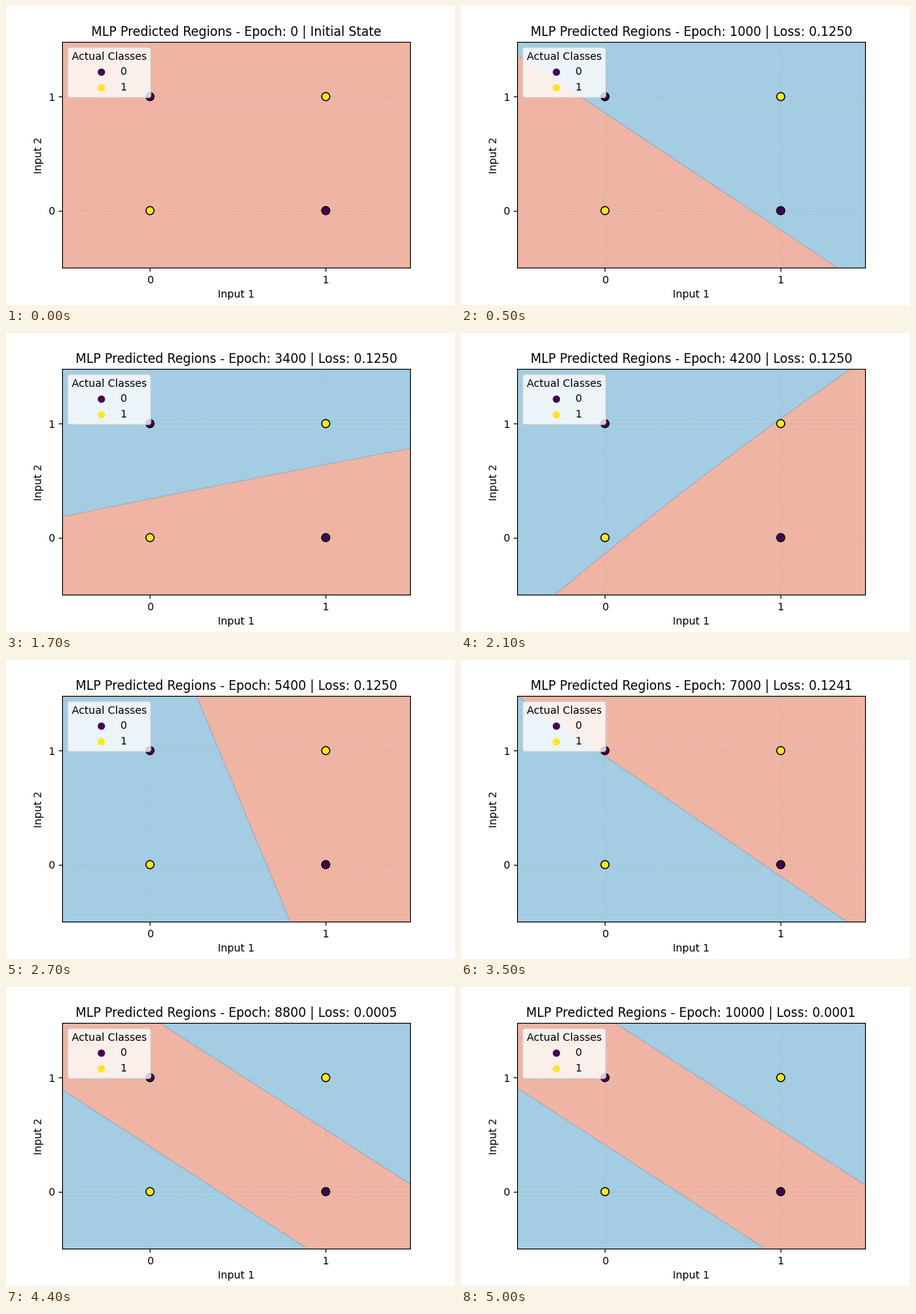
Write a matplotlib script that moves like this. It is 600x400 px and loops after 5.1 s.

```python
import numpy as np
import matplotlib.pyplot as plt
from matplotlib.animation import FuncAnimation

FRAMES, INTERVAL, EPOCHS_PER_FRAME = 51, 100, 200


def ramp(i, middle, width):
    return 1 / (1 + np.exp((middle - i) / width))


def bump(i, middle, width):
    return np.exp(-((i - middle) / width) ** 2)


def decay(i, start, span):
    return np.exp((start - i) / span)


def main_angle(i):
    """Direction in degrees: a slow drift, then a quick turn that settles."""
    still_to_turn = (184 - 2.55 * i) * (1 - ramp(i, 24.96, 2.4))
    return 147 - still_to_turn - 50 * decay(i, 0, 3)


def main_offset(i):
    """Pixels from the plot centre: enters, wobbles, then moves aside."""
    entry = 320 * decay(i, 0, 1.2) - 26 * bump(i, 6, 3)
    wobble = 17 * bump(i, 30.5, 2) - 15.5 * bump(i, 24, 5)
    aside = 72 * ramp(i, 36.9, 0.75) + 11 * bump(i, 40, 3)
    return 1 + entry + wobble + aside


def corner_angle(i):
    return -32.55 - 0.04 * (i - 39)


def corner_offset(i):
    return 71.3 + 14.7 * decay(i, 39, 1.2)


def loss(i):
    """A long plateau followed by a power-law fall."""
    fall = np.log1p(np.exp((i - 38.86) / 0.66))
    return 0.125 * (1 + fall) ** -2.5 + 0.003 * decay(i, 0, 1.2)


axis = np.arange(-0.5, 1.5, 0.02)
X, Y = np.meshgrid(axis, axis)
U = (X - 0.49) * 465 / 1.98
V = (Y - 0.49) * 302 / 1.98


def side(degrees, offset, bulge=0):
    """Signed pixel distance from a slightly bowed line."""
    a = np.radians(degrees)
    along = U * np.cos(a) + V * np.sin(a)
    across = V * np.cos(a) - U * np.sin(a)
    return across - offset - bulge * (1 - (along / 250) ** 2)


def prediction(i):
    main = side(main_angle(i), main_offset(i), 6 * bump(i, 21, 3))
    corner = side(corner_angle(i), corner_offset(i))
    return ramp(np.maximum(main, corner), 0, 60)


fig, ax = plt.subplots(figsize=(6, 4), dpi=100)
fig.subplots_adjust(left=0.125, right=0.9, bottom=0.125, top=0.88)

points = ax.scatter([0, 0, 1, 1], [0, 1, 0, 1], c=[1, 0, 0, 1], cmap="viridis",
                    s=60, edgecolors="k", linewidths=1, zorder=2)
ax.legend(*points.legend_elements(), title="Actual Classes", loc="upper left")
ax.set(xlim=(axis[0], axis[-1]), ylim=(axis[0], axis[-1]),
       xticks=[0, 1], yticks=[0, 1], xlabel="Input 1", ylabel="Input 2")
ax.grid(True, linestyle=":", alpha=0.6)
title = ax.set_title("")
regions = None


def update(i):
    global regions
    if regions is not None:
        regions.remove()
    regions = ax.contourf(X, Y, prediction(i), levels=[0, 0.5, 1],
                          cmap="RdBu", alpha=0.6, zorder=0)
    status = f"Loss: {loss(i):.4f}" if i else "Initial State"
    title.set_text(f"MLP Predicted Regions - Epoch: {i * EPOCHS_PER_FRAME} | {status}")
    return [regions, title]


anim = FuncAnimation(fig, update, frames=FRAMES, interval=INTERVAL,
                     repeat=True, repeat_delay=0, blit=False)
plt.show()
```
